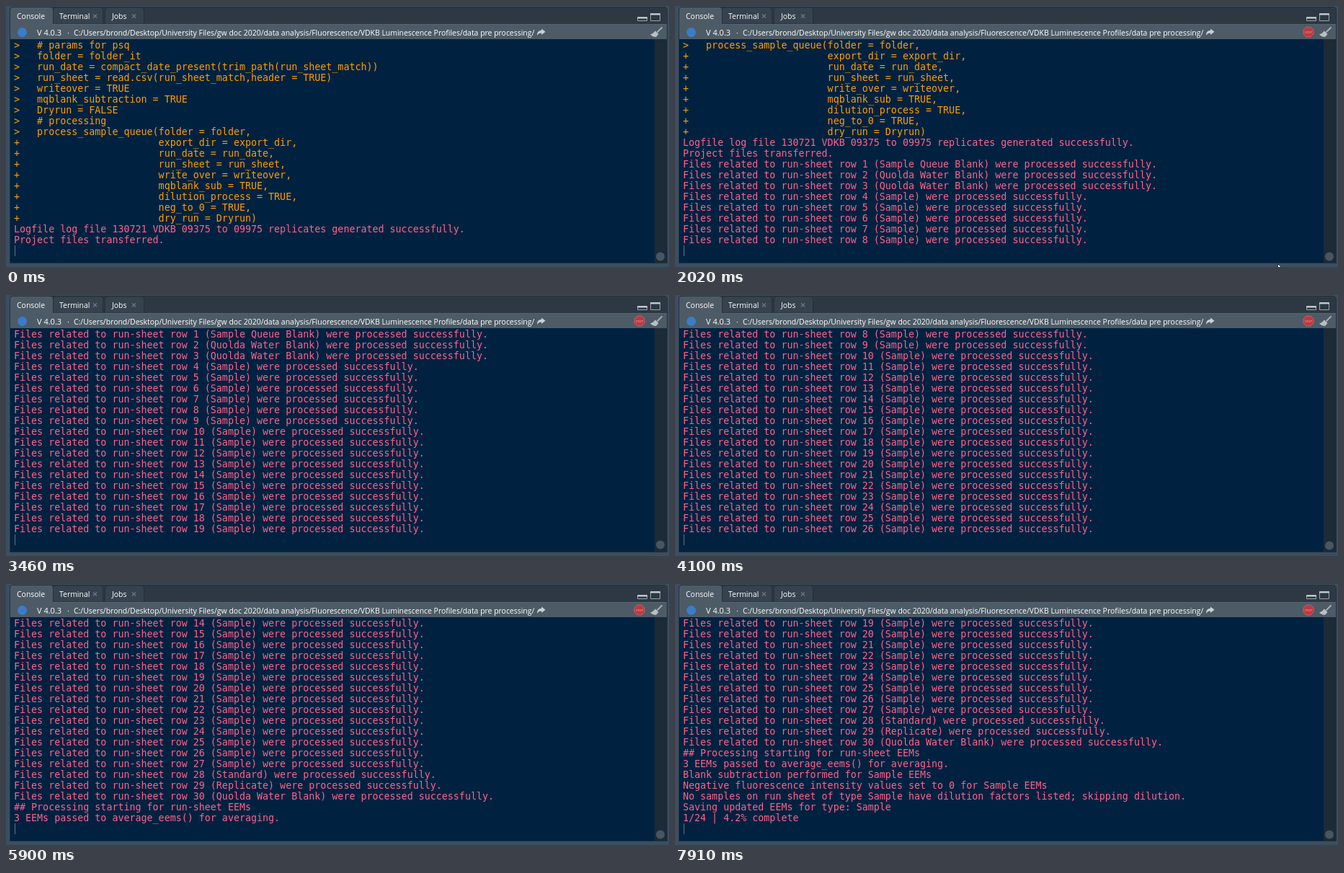
These frames come from a looping animation (920x362 px, 8 s). An HTML page:

```html
<!DOCTYPE html>
<html lang="en">
<head>
<meta charset="utf-8">
<title>Console</title>
<style>
html, body { margin: 0; width: 100%; height: 100%; overflow: hidden; background: #3b4f62; }
#stage { position: relative; width: 920px; height: 362px; overflow: hidden; }
svg { position: absolute; left: 0; top: 0; }
svg text { font-family: "Open Sans", sans-serif; font-size: 10.44px; fill: #fff; white-space: pre; }
svg .tiny { font-size: 4px; fill: #f0b8b8; }
#view { position: absolute; left: 6px; top: 47px; width: 894px; height: 286px; overflow: hidden; }
#log {
  margin: 0; padding-left: 5px; color: #ff628c;
  font: 13.34px/15px "DejaVu Sans Mono", monospace;
  animation: scroll 8s step-end infinite;
}
#log b { font-weight: normal; color: #ff9d00; }
#stop { animation: stop 8s step-end infinite; }
#mouse { animation: mouse 8s step-end infinite; }
#thumb { animation: thumb 8s step-end infinite; }

@keyframes scroll {
  0% { translate: 0 0 }
  1.12% { translate: 0 -15px }
  2.24% { translate: 0 -30px }
  3.37% { translate: 0 -45px }
  6.74% { translate: 0 -60px }
  7.74% { translate: 0 -75px }
  8.87% { translate: 0 -90px }
  13.49% { translate: 0 -105px }
  25.24% { translate: 0 -120px }
  26.62% { translate: 0 -150px }
  27.74% { translate: 0 -165px }
  33.62% { translate: 0 -180px }
  39.49% { translate: 0 -210px }
  40.62% { translate: 0 -240px }
  41.87% { translate: 0 -255px }
  42.99% { translate: 0 -285px }
  44.24% { translate: 0 -315px }
  48.99% { translate: 0 -330px }
  50.12% { translate: 0 -360px }
  51.24% { translate: 0 -390px }
  58.24% { translate: 0 -405px }
  59.49% { translate: 0 -420px }
  66.74% { translate: 0 -435px }
  67.87% { translate: 0 -450px }
  73.74% { translate: 0 -480px }
  94.37% { translate: 0 -495px }
  95.49% { translate: 0 -510px }
  96.62% { translate: 0 -525px }
  97.74% { translate: 0 -540px }
  98.87%, 100% { translate: 0 -555px }
}
@keyframes stop {
  0% { opacity: 0 }
  5.62%, 100% { opacity: 1 }
}
@keyframes mouse {
  0%, 39.49%, 100% { opacity: 0 }
  5.62% { opacity: 1 }
}
@keyframes thumb {
  0%, 3.37%, 8.87%, 27.74%, 44.24%, 51.24%, 59.49%, 67.87%, 98.87%, 100% { translate: 0 0 }
  1.12%, 5.62%, 26.62%, 39.49%, 48.99%, 58.24%, 66.74%, 94.37% { translate: 0 -1px }
}
</style>
</head>
<body>
<div id="stage">
  <svg width="920" height="362" viewBox="0 0 920 362">
    <rect width="920" height="362" fill="#3b4f62"/>
    <!-- tab strip and toolbar -->
    <path d="M5.500 356.500V6q0-4.500 4-4.500H913q4.500 0 4.500 4.500V356.500z" fill="#2d3842" stroke="#25303a"/>
    <path d="M65.500 25V6q0-4 4-4H130.500q4 0 4 4V25zM137.500 25V6q0-4 4-4H187.500q4 0 4 4V25z" fill="#36434e" stroke="#25303a"/>
    <path d="M6 25V6q0-4 4-4H61q4 0 4 4V25H917V46H6z" fill="#4d5b66"/>
    <path d="M65 25.500H917" stroke="#566570"/>
    <text x="15" y="18">Console</text>
    <text x="74" y="18">Terminal</text>
    <text x="147" y="18">Jobs</text>
    <path id="close" d="M121 11.500l5 5m0-5l-5 5" stroke="#6b7983" stroke-width="1.300"/>
    <use href="#close" x="54"/>
    <!-- window buttons -->
    <path d="M876.500 15.500h13v5h-13z" fill="#2d3842" stroke="#98a4ac"/>
    <path d="M876 16.500h14" stroke="#c5ced4" stroke-width="2"/>
    <path d="M894.500 10.500h13v10h-13z" fill="#2d3842" stroke="#98a4ac"/>
    <path d="M894 11.500h14" stroke="#c5ced4" stroke-width="2"/>
    <!-- path bar -->
    <circle cx="22.500" cy="36.500" r="6.500" fill="#3b7cc9"/>
    <text x="43" y="41" style="font-size:11px">V 4.0.3</text>
    <text x="85" y="41">·</text>
    <text x="94" y="41">C:/Users/brond/Desktop/University Files/gw doc 2020/data analysis/Fluorescence/VDKB Luminescence Profiles/data pre processing/</text>
    <path d="M737 41c0-5 2-7 6-7V31.500l5.500 4.300-5.500 4.300V37.500c-3 0-4.500 1-6 3.500z" fill="#c8d0d5"/>
    <g id="stop">
      <path d="M876 29h6l4 4v6l-4 4h-6l-4-4v-6z" fill="#bd3a42" stroke="#d36a6e" stroke-width=".7"/>
      <text class="tiny" x="874" y="37.500">STOP</text>
    </g>
    <path d="M910.500 29.500l-7 7" stroke="#a9b2b8" stroke-width="1.800"/>
    <path d="M901 34.500l4.500 4.500-3.500 4q-4.500 0-8-3.500 4-1 7-5z" fill="#b9c0c4"/>
    <!-- console body -->
    <rect x="6" y="46" width="911" height="310" fill="#002240"/>
    <rect x="900" y="46" width="17" height="310" fill="#1c2b37"/>
    <circle id="thumb" cx="908" cy="347.500" r="6" fill="#485661"/>
    <rect x="12" y="332" width="1" height="15" fill="#5f7284"/>
    <path id="mouse" d="M836.500 357.500v8l5-3z" fill="#fff" stroke="#111" stroke-width=".8"/>
  </svg>
  <div id="view"><pre id="log"></pre></div>
</div>
<script>
const code = [
  "# params for psq",
  "folder = folder_it",
  "run_date = compact_date_present(trim_path(run_sheet_match))",
  "run_sheet = read.csv(run_sheet_match,header = TRUE)",
  "writeover = TRUE",
  "mqblank_subtraction = TRUE",
  "Dryrun = FALSE",
  "# processing",
  "process_sample_queue(folder = folder,"
].map(s => ">   " + s);

const args = [
  "export_dir = export_dir,",
  "run_date = run_date,",
  "run_sheet = run_sheet,",
  "write_over = writeover,",
  "mqblank_sub = TRUE,",
  "dilution_process = TRUE,",
  "neg_to_0 = TRUE,",
  "dry_run = Dryrun)"
].map(s => "+".padEnd(25) + s);

const water = "Quolda Water Blank";
const kinds = { 1: "Sample Queue Blank", 2: water, 3: water, 28: "Standard", 29: "Replicate", 30: water };
const rows = Array.from({ length: 30 }, (_, i) =>
  `Files related to run-sheet row ${i + 1} (${kinds[i + 1] || "Sample"}) were processed successfully.`);

const output = [
  "Logfile log file 130721 VDKB 09375 to 09975 replicates generated successfully.",
  "Project files transferred.",
  ...rows,
  "## Processing starting for run-sheet EEMs",
  "3 EEMs passed to average_eems() for averaging.",
  "Blank subtraction performed for Sample EEMs",
  "Negative fluorescence intensity values set to 0 for Sample EEMs",
  "No samples on run sheet of type Sample have dilution factors listed; skipping dilution.",
  "Saving updated EEMs for type: Sample",
  "1/24 | 4.2% complete"
];

const input = document.createElement("b");
input.textContent = [...code, ...args].join("\n") + "\n";
document.getElementById("log").append(input, output.join("\n"));
</script>
</body>
</html>
```
